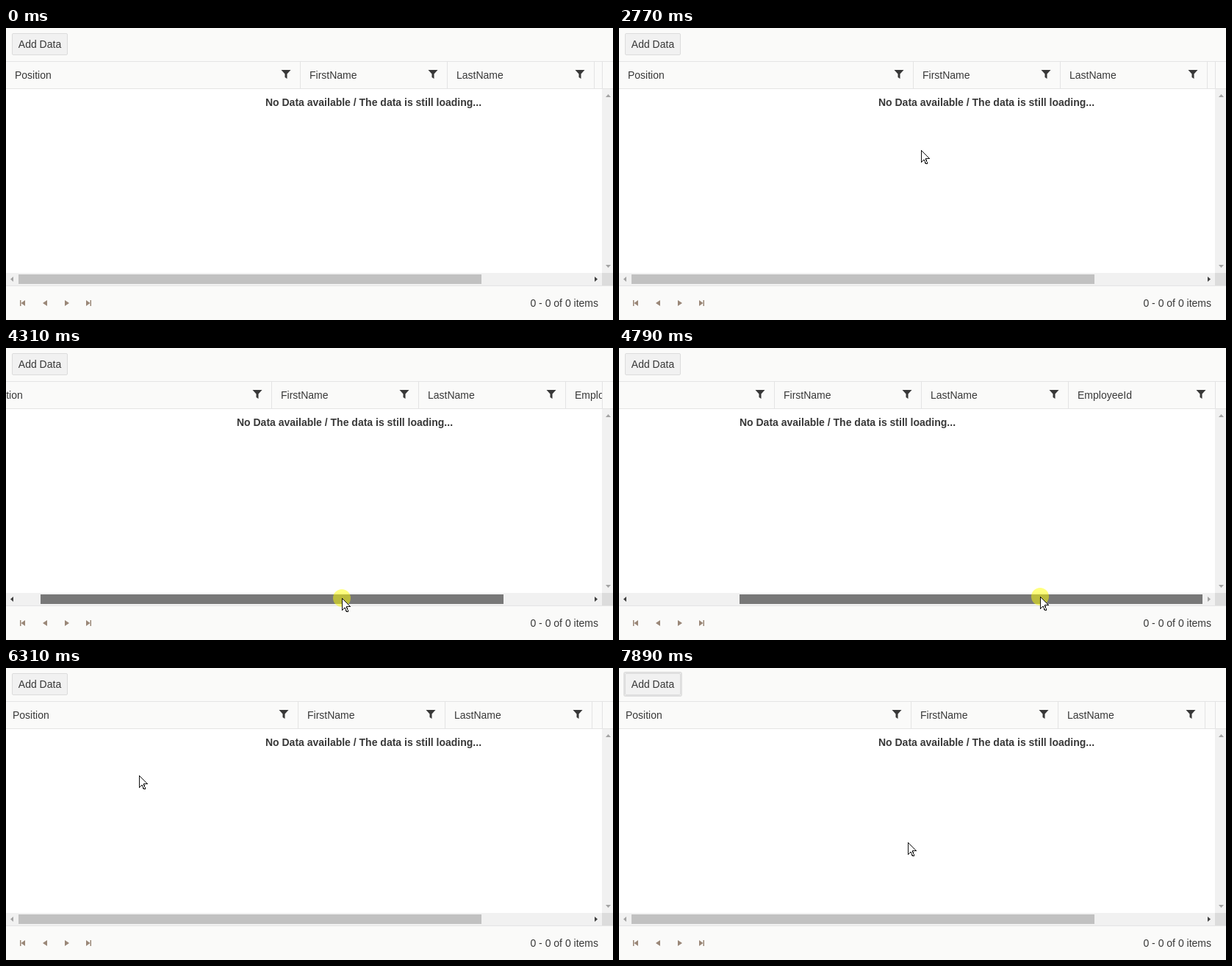
Animation of 826 by 397 pixels, one loop 8 s. Source, as an HTML page:

```html
<!DOCTYPE html>
<html lang="en">
<head>
<meta charset="utf-8">
<title>Empty data grid</title>
<style>
  html, body { margin: 0; width: 100%; height: 100%; overflow: hidden; background: #fff; }
  svg { display: block; width: 826px; height: 397px; }
  text { font: 14px "Liberation Sans", Arial, sans-serif; fill: #383838; white-space: pre; }
  .bold { font-weight: bold; }
  .line { fill: #e4e4e4; }
  .bar { fill: #fafaf9; }
  .track { fill: #f1f1f1; }
  .dim { fill: #a3a3a3; }
  .pager { fill: #9a8778; }
</style>
</head>
<body>
<svg viewBox="0 0 826 397">
  <defs>
    <clipPath id="view"><rect y="46" width="811" height="287"/></clipPath>
    <path id="funnel" d="M-6.5 57h13l-5 5.5v6.5l-3-2v-4.5z" fill="#383838"/>
  </defs>
  <rect width="826" height="397" fill="#fff"/>

  <rect class="bar" width="826" height="82"/>
  <rect class="line" y="45" width="826" height="1"/>
  <rect id="ring" x="7" y="6" width="78" height="32" rx="2" fill="none" stroke="#e0e0e0" stroke-width="2"/>
  <rect x="8.5" y="7.5" width="75" height="29" rx="1.5" fill="#f1f1f1" stroke="#dcdcdc"/>
  <text x="46" y="27" text-anchor="middle">Add Data</text>

  <g clip-path="url(#view)">
    <g id="head"></g>
    <rect id="row" y="83" width="811" height="36" fill="#ececec"/>
    <text id="note" class="bold" x="500" y="106" text-anchor="middle">No Data available / The data is still loading...</text>
  </g>
  <rect class="line" x="811" y="46" width="1" height="36"/>
  <rect class="line" y="82" width="826" height="1"/>

  <rect class="track" x="811" y="83" width="15" height="250"/>
  <path class="dim" d="M816 94l3.5-4 3.5 4zM816 322h7l-3.5 4z"/>
  <rect class="track" y="333" width="811" height="17"/>
  <rect x="811" y="333" width="15" height="17" fill="#dcdcdc"/>
  <rect id="thumb" x="17" y="335" width="630" height="13"/>
  <path id="left" d="M10 338v7l-4-3.5z"/>
  <path id="right" d="M801 338v7l4-3.5z"/>

  <rect class="bar" y="350" width="826" height="47"/>
  <rect class="line" y="350" width="826" height="1"/>
  <path class="pager" d="M19 370h1.5v8H19zM26 370v8l-5.5-4zM56 370v8l-6-4zM80 370v8l6-4zM109 370v8l5.5-4zM114.5 370h1.5v8h-1.5z"/>
  <text x="806" y="379" text-anchor="end">0 - 0 of 0 items</text>

  <g id="cursor">
    <circle id="click" r="12" fill="#ff0" fill-opacity=".5"/>
    <path id="arrow" d="M.5.5v16l3.5-3.5 2.5 5.5h1.5l.5-1-2-5.5 5-.5z" fill="#fff" stroke="#111" shape-rendering="crispEdges"/>
    <path id="beam" d="M-3.5-7.5h2.5l1 1 1-1h2.5M-3.5 7.5h2.5l1-1 1 1h2.5M0-6.5v13" fill="none" stroke="#222"/>
  </g>
</svg>
<script>
const LOOP = 8000, STEP = 70, MAX_SCROLL = 189, TRAVEL = 147;
const ENTER = 390, GRAB = 4110, RETURN = 4930, RELEASE = 5690;
const PRESS = 7000, LIFT = 7060, GRAB_X = 427;

const $ = id => document.getElementById(id);
const clamp = (v, lo, hi) => Math.min(hi, Math.max(lo, v));
const within = (v, lo, hi) => v >= lo && v < hi;
const show = (id, on) => $(id).setAttribute("visibility", on ? "visible" : "hidden");
const move = (id, x, y = 0) => $(id).setAttribute("transform", `translate(${x} ${y})`);
const fill = (id, color) => $(id).setAttribute("fill", color);

// Each glide is a curve from the last resting point, bent towards `via`
const glides = [];
let rest = [575, 386];
function glide(start, end, to, via = to.map((v, k) => (v + rest[k]) / 2)) {
  glides.push({ start, end, from: rest, via, to });
  rest = to;
}
glide(ENTER, 1160, [460, 115], [478, 230]);
glide(1230, 1430, [461, 107]);
glide(1890, 1960, [449, 115]);
glide(1960, 2380, [699, 119], [600, 0]);
glide(2380, 2770, [411, 166], [540, 190]);
glide(2770, 3430, [349, 195], [300, -46]);
glide(3430, 3640, [GRAB_X, 340]);
glide(GRAB, 4790, [573, 338]);
glide(RETURN, RELEASE, [420, 347]);
glide(RELEASE, 6310, [181, 146], [290, 290]);
glide(6310, 6800, [20, 18], [70, 30]);
glide(7260, 7890, [393, 237]);

function cursorAt(t) {
  const { start, end, from, via, to } = glides.findLast(g => t >= g.start) || glides[0];
  const stepped = Math.floor((t - start) / STEP) * STEP;
  const u = t >= end ? 1 : clamp(stepped / (end - start), 0, 1), v = 1 - u;
  return from.map((a, k) => Math.round(v * v * a + 2 * u * v * via[k] + u * u * to[k]));
}

$("head").innerHTML = ["Position", "FirstName", "LastName", "EmployeeId"].map((name, i) => {
  const start = i && 201 + i * 200, end = 400 + i * 200;
  return `<text x="${start + 12}" y="69">${name}</text>
    <use href="#funnel" x="${end - 19}"/>
    <rect class="line" x="${end}" y="46" width="1" height="36"/>`;
}).join("");

function draw(t) {
  const visible = t >= ENTER, [x, y] = cursorAt(t);
  const dragging = within(t, GRAB, RELEASE);
  const scroll = dragging ? Math.round(clamp((x - GRAB_X) / 146, 0, 1) * MAX_SCROLL) : 0;
  // The header stays 3px behind once it has been dragged back
  const headScroll = t >= RETURN ? Math.max(3, scroll) : scroll;
  const onThumb = visible && within(y, 335, 348) && within(x, 17, 647);
  const onText = !dragging && within(x, 353, 647) && within(y, 93, 110);
  const arrowColor = active => active ? "#404040" : "#a3a3a3";

  move("head", -headScroll);
  move("note", -scroll);
  move("thumb", Math.round(scroll / MAX_SCROLL * TRAVEL));
  fill("thumb", dragging ? "#787878" : onThumb ? "#a8a8a8" : "#c1c1c1");
  fill("left", arrowColor(scroll > 0));
  fill("right", arrowColor(scroll < MAX_SCROLL));
  show("row", !dragging && within(y, 83, 119));
  show("ring", t >= PRESS);

  move("cursor", x, y);
  show("arrow", visible && !onText);
  show("beam", onText);
  show("click", dragging || within(t, PRESS, LIFT));
}

const origin = performance.now();
function tick() {
  draw((performance.now() - origin) % LOOP);
  requestAnimationFrame(tick);
}
tick();
</script>
</body>
</html>
```
